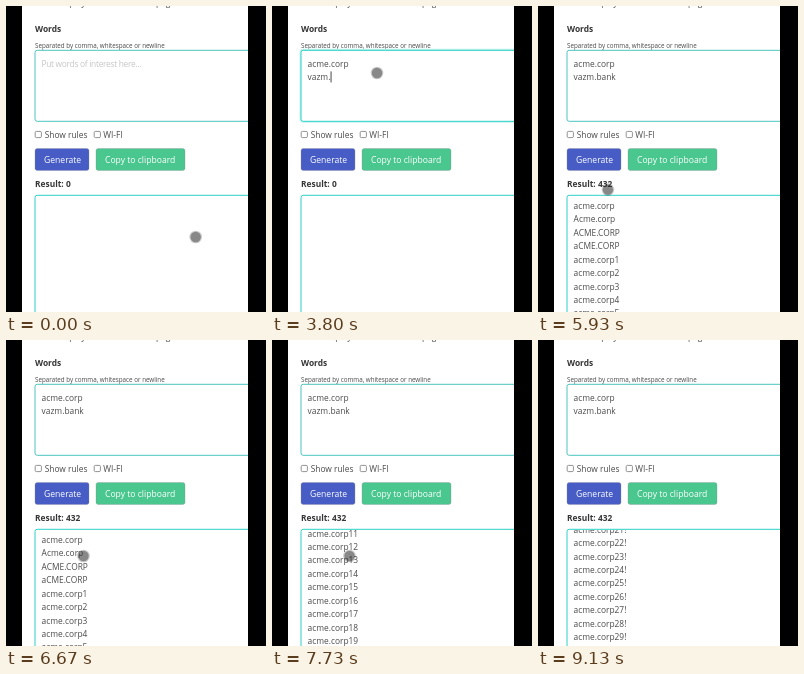
An HTML page that plays this animation: 260x306 px, repeating every 9.47 s.

```html
<!DOCTYPE html>
<html lang="en">
<head>
<meta charset="utf-8">
<title>Word generator</title>
<style>
  html, body { margin: 0; width: 100%; height: 100%; overflow: hidden; background: #000; }
  svg { display: block; width: 260px; height: 306px; }
  text { font: 8.4px "Open Sans", "Noto Sans", sans-serif; fill: #4a4a4a; white-space: pre; }
  .label { font-weight: 700; fill: #363636; }
  .hint { font-size: 6.25px; }
  .button text { font-size: 8.6px; fill: #fff; }
  .button rect { stroke: #8c8c96; stroke-opacity: .45; stroke-width: .7; }
  #placeholder { letter-spacing: -.28px; fill: #c6c6c6; }
  .field { fill: #fff; stroke: #4cc4be; stroke-width: 1; }
  .focus .field, .result { stroke: #2bd0c6; }
  .halo { fill: none; stroke: #c4f3ed; stroke-width: 3; visibility: hidden; }
  .focus .halo { visibility: visible; }
  .box { fill: #fff; stroke: #777; stroke-width: .8; }
</style>
</head>
<body>
<svg viewBox="0 0 260 306">
  <defs>
    <clipPath id="page"><rect x="16" width="226" height="306"/></clipPath>
    <clipPath id="list"><rect x="29.5" y="190" width="212.5" height="116"/></clipPath>
  </defs>
  <rect width="260" height="306"/>
  <g clip-path="url(#page)">
    <rect x="16" width="226" height="306" fill="#fff"/>
    <text x="52" y="0">display the words on the page</text>
    <text class="label" x="29" y="26">Words</text>
    <text class="hint" x="29" y="42">Separated by comma, whitespace or newline</text>

    <g id="input">
      <rect class="halo" x="29" y="44.3" width="230" height="71" rx="2.2"/>
      <rect class="field" x="29" y="44.3" width="230" height="71" rx="2.2"/>
      <text id="placeholder" x="35.4" y="61">Put words of interest here...</text>
      <text id="line0" x="35.6" y="61"></text>
      <text id="line1" x="35.6" y="74.4"></text>
      <rect id="caret" width=".9" height="11" fill="#333"/>
    </g>

    <rect class="box" x="29.2" y="125.4" width="6.2" height="6.2" rx="1.2"/>
    <text x="38.7" y="132">Show rules</text>
    <rect class="box" x="88.2" y="125.4" width="6.2" height="6.2" rx="1.2"/>
    <text x="97.2" y="132" font-size="9">WI-FI</text>

    <g class="button">
      <rect x="29" y="142.5" width="54" height="22" rx="2.2" fill="#475dc5"/>
      <text x="38" y="157">Generate</text>
      <rect x="90" y="142.5" width="89" height="22" rx="2.2" fill="#4ac68f"/>
      <text x="99" y="157">Copy to clipboard</text>
    </g>

    <text class="label" id="count" x="29" y="181.3"></text>
    <rect class="field result" x="29" y="189.3" width="230" height="130" rx="2.2"/>
    <g clip-path="url(#list)"><g id="rows"></g></g>

    <g id="pointer">
      <circle r="6.3" fill="#2d2d2d" fill-opacity=".25"/>
      <circle r="5.2" fill="#2d2d2d" fill-opacity=".42"/>
    </g>
  </g>
</svg>
<script>
const LOOP = 9470, FOCUS = 600, GENERATE = 5530, ROW = 13.43;
const $ = id => document.getElementById(id);
const clamp = v => Math.min(1, Math.max(0, v));
const ease = p => p * p * (3 - 2 * p);

const words = [
  { text: 'acme.corp', start: 1000, step: 155, line: $('line0') },
  { text: 'vazm.bank', start: 3130, step: 160, line: $('line1') }
];
const ENTER = 2600;

// Sums eased steps, each given as start, end and distance
const travel = (t, from, moves) => moves.reduce(
  (sum, [a, b, d]) => sum + d * ease(clamp((t - a) / (b - a))), from);

const pointerX = t => travel(t, 189.7, [[70, 730, -84.7], [4730, 5130, -42], [5800, 6070, 14.5], [8730, 9130, 131]]);
const pointerY = t => travel(t, 231, [[70, 730, -164], [4730, 5130, 87], [5800, 6070, 62], [8730, 9130, 98]]);
const scrollY = t => travel(t, 0, [[6700, 7530, 194.5], [7730, 8270, 406], [8600, 8930, 148.5]]);

const results = ['acme.corp', 'Acme.corp', 'ACME.CORP', 'aCME.CORP'];
for (const end of ['', '!'])
  for (let n = 1; n <= 31; n++) results.push('acme.corp' + n + end);

results.forEach((value, i) => {
  const row = document.createElementNS('http://www.w3.org/2000/svg', 'text');
  row.setAttribute('x', 35.6);
  row.setAttribute('y', 203 + i * ROW);
  row.textContent = value;
  $('rows').append(row);
});

function show(id, on) {
  $(id).setAttribute('visibility', on ? 'visible' : 'hidden');
}

function setText(node, value) {
  if (node.textContent !== value) node.textContent = value;
}

function drawInput(t) {
  let typing = false;
  for (const { text, start, step, line } of words) {
    const typed = Math.max(0, Math.floor((t - start) / step) + 1);
    setText(line, text.slice(0, typed));
    typing ||= typed > 0 && typed <= text.length + 2;
  }
  show('placeholder', t < words[0].start);

  const focused = t >= FOCUS && t < GENERATE;
  $('input').classList.toggle('focus', focused);
  const row = t < ENTER ? 0 : 1;
  const { line } = words[row];
  const width = line.textContent ? line.getComputedTextLength() : 0;
  $('caret').setAttribute('x', 35.8 + width);
  $('caret').setAttribute('y', 52 + row * ROW);
  show('caret', focused && (typing || (t - FOCUS) % 1060 < 530));
}

function render(t) {
  drawInput(t);
  const done = t >= GENERATE;
  setText($('count'), 'Result: ' + (done ? 432 : 0));
  show('rows', done);
  $('rows').setAttribute('transform', `translate(0 ${-scrollY(t)})`);
  $('pointer').setAttribute('transform', `translate(${pointerX(t)} ${pointerY(t)})`);
}

const start = performance.now();
function frame() {
  render((performance.now() - start) % LOOP);
  requestAnimationFrame(frame);
}
frame();
</script>
</body>
</html>
```
